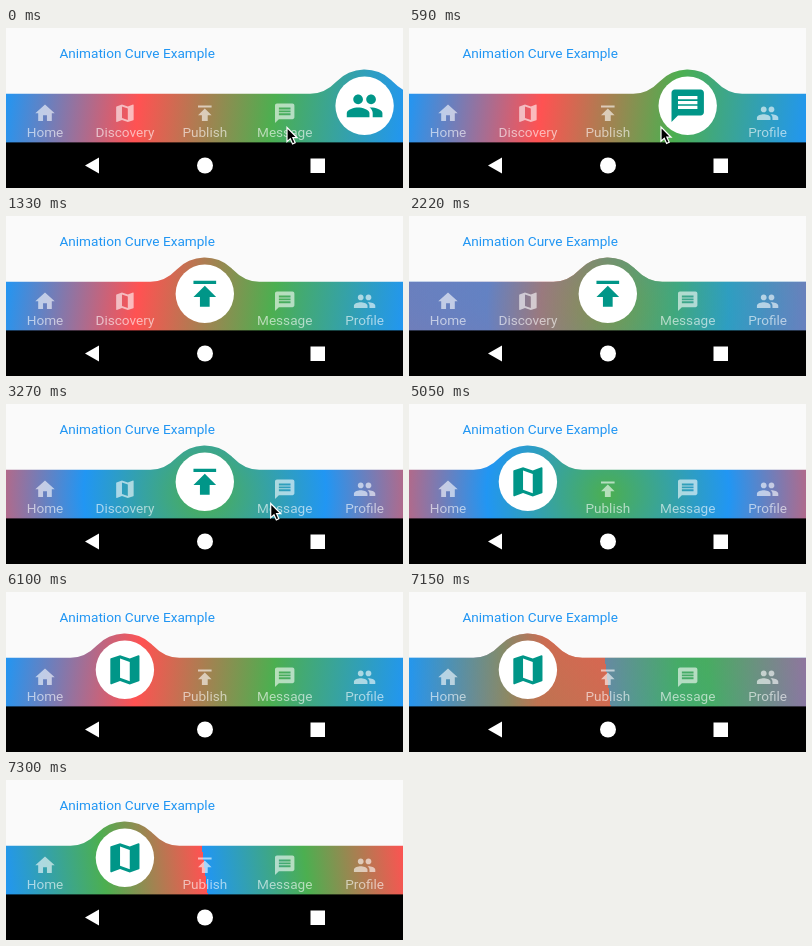
An HTML page with a canvas for the animation above (8000 ms loop, 397x160 px).

```html
<!DOCTYPE html>
<html lang="en">
<head>
<meta charset="utf-8">
<title>Animation Curve Example</title>
<style>
html, body { margin: 0; width: 100%; height: 100%; overflow: hidden; background: #fafafa; }
canvas { display: block; }
</style>
</head>
<body>
<canvas id="stage" width="397" height="160"></canvas>
<script>
const ctx = document.getElementById('stage').getContext('2d');
const W = 397, H = 160, TOP = 65.8, BOTTOM = 114.4, LOOP = 8000, STEP = 145;
const LEFT = -1, RIGHT = 398.5, MID = 198.8;
const BLUE = '#2196f3', RED = '#ff5252', GREEN = '#4caf50', TEAL = '#009688';
const FONT = '13.6px Roboto, sans-serif';

// Icons on a 24 unit grid
const tabs = [
  ['Home', 'M10 20v-6h4v6h5v-8h3L12 3 2 12h3v8z'],
  ['Discovery', 'M20.5 3l-.16.03L15 5.1 9 3 3.36 4.9c-.21.07-.36.25-.36.48V20.5c0 .28.22.5.5.5l.16-.03L9 18.9l6 2.1 5.64-1.9c.21-.07.36-.25.36-.48V3.5c0-.28-.22-.5-.5-.5zM15 19l-6-2.11V5l6 2.11V19z'],
  ['Publish', 'M5 4v2h14V4H5zm0 10h4v6h6v-6h4l-7-7-7 7z'],
  ['Message', 'M20 2H4c-1.1 0-1.99.9-1.99 2L2 22l4-4h14c1.1 0 2-.9 2-2V4c0-1.1-.9-2-2-2zm-2 12H6v-2h12v2zm0-3H6V9h12v2zm0-3H6V6h12v2z'],
  ['Profile', 'M16 11c1.66 0 2.99-1.34 2.99-3S17.66 5 16 5c-1.66 0-3 1.34-3 3s1.34 3 3 3zm-8 0c1.66 0 2.99-1.34 2.99-3S9.66 5 8 5C6.34 5 5 6.34 5 8s1.34 3 3 3zm0 2c-2.33 0-7 1.17-7 3.5V19h14v-2.5c0-2.33-4.67-3.5-7-3.5zm8 0c-.29 0-.62.02-.97.05 1.16.84 1.97 1.97 1.97 3.45V19h6v-2.5c0-2.33-4.67-3.5-7-3.5z']
].map(([label, d], i) => ({ label, icon: new Path2D(d), x: 39 + 79.9 * i }));

const arrow = new Path2D('M0 0V15.5L3.6 12.2 6.1 17.8 8.9 16.5 6.4 11.1H11z');

function fillStops(gradient, stops) {
  stops.forEach(([at, color]) => gradient.addColorStop(at, color));
  return gradient;
}
const linear = (y1, y2) => ctx.createLinearGradient(LEFT, y1, RIGHT, y2);
const rainbow = fillStops(linear(TOP, BOTTOM),
  [[0, BLUE], [1 / 3, RED], [2 / 3, GREEN], [1, BLUE]]);
const radial = fillStops(ctx.createRadialGradient(MID, 90, 0, MID, 90, 242.7),
  [[0, GREEN], [0.5, BLUE], [1, RED]]);
const repeated = fillStops(linear(BOTTOM, TOP),
  [[0, BLUE], [0.25, GREEN], [0.5, RED], [0.5, BLUE], [0.75, GREEN], [1, RED]]);

const taps = [[150, 4, 3], [1030, 3, 2], [3570, 2, 3], [4760, 3, 1]];   // time, from, to
const themes = [[2220, rainbow, radial], [5950, radial, rainbow], [7150, rainbow, repeated]];

// Cursor strokes: start, end of visibility, points visited one per step
const strokes = [
  [0, 450, [281, 99.5]],
  [450, 1330, [252, 99], [218, 99], [189, 98.5]],
  [2820, 4020, [335, 52], [296, 83], [262, 102], [264.7, 99.5]],
  [4020, 5050, [228, 99.5], [172, 99.5], [131, 99.5]]
];

// Stepped progress: 1/n at start, 1 after n - 1 further steps
const progress = (t, start, n) =>
  Math.max(0, Math.min(1, (Math.floor((t - start) / STEP) + 1) / n));

const latest = (list, t) => list.filter(e => e[0] <= t).pop() || list[0];
const ease = p => p * p * (3 - 2 * p);

function drawIcon(tab, y, scale, color) {
  ctx.save();
  ctx.translate(tab.x, y);
  ctx.scale(scale, scale);
  ctx.translate(-12, -12);
  ctx.fillStyle = color;
  ctx.fill(tab.icon);
  ctx.restore();
}

function disc(x, y, r, color) {
  ctx.fillStyle = color;
  ctx.beginPath();
  ctx.arc(x, y, r, 0, 7);
  ctx.fill();
}

// Flat bar with a circular bump whose feet are tangent curves
function barPath(x) {
  const r = 38.8, cy = 80.3, angle = 0.762;
  const dx = r * Math.cos(angle), dy = r * Math.sin(angle);
  const p = new Path2D();
  p.moveTo(0, TOP);
  p.lineTo(x - 54.4, TOP);
  p.quadraticCurveTo(x - 39.8, TOP, x - dx, cy - dy);
  p.arc(x, cy, r, Math.PI + angle, -angle);
  p.quadraticCurveTo(x + 39.8, TOP, x + 54.4, TOP);
  p.lineTo(W, TOP);
  p.lineTo(W, H);
  p.lineTo(0, H);
  return p;
}

function drawBar(t, x) {
  const [start, before, after] = latest(themes, t);
  const path = barPath(x);
  const mix = progress(t, start, 2);
  if (mix < 1) {
    ctx.fillStyle = before;
    ctx.fill(path);
  }
  ctx.globalAlpha = mix;
  ctx.fillStyle = after;
  ctx.fill(path);
  ctx.globalAlpha = 1;
}

function drawTabs(active, grow) {
  ctx.textAlign = 'center';
  tabs.forEach((tab, i) => {
    if (i === active) {
      disc(tab.x, 77.8, 29.2 * grow, '#fff');
      drawIcon(tab, 77.8, 1.62 * grow, TEAL);
    } else {
      drawIcon(tab, 85.3, 0.971, 'rgba(255,255,255,.6)');
      ctx.fillStyle = 'rgba(255,255,255,.6)';
      ctx.fillText(tab.label, tab.x, 109);
    }
  });
}

function drawSystemBar() {
  ctx.fillStyle = '#000';
  ctx.fillRect(0, BOTTOM, W, H - BOTTOM);
  ctx.fillStyle = '#fff';
  ctx.fill(new Path2D('M79 137.5L93 129.5V145.5z'));
  ctx.fillRect(304.5, 130.5, 14.5, 14.5);
  disc(199, 137.5, 8, '#fff');
}

function drawCursor(t) {
  const [start, end, ...points] = latest(strokes, t);
  if (t >= end) return;
  const step = Math.min(points.length - 1, Math.floor((t - start) / STEP));
  ctx.save();
  ctx.translate(...points[step]);
  ctx.scale(0.92, 0.92);
  ctx.lineWidth = 1.3;
  ctx.strokeStyle = '#fff';
  ctx.fillStyle = '#000';
  ctx.fill(arrow);
  ctx.stroke(arrow);
  ctx.restore();
}

function draw(t) {
  const [start, from, to] = latest(taps, t);
  const p = ease(progress(t, start, 2));
  ctx.fillStyle = '#fafafa';
  ctx.fillRect(0, 0, W, H);
  ctx.font = FONT;
  ctx.textAlign = 'left';
  ctx.fillStyle = BLUE;
  ctx.fillText('Animation Curve Example', 53.4, 30);
  drawBar(t, tabs[from].x + (tabs[to].x - tabs[from].x) * p);
  drawTabs(t < start ? from : to, p || 1);
  drawSystemBar();
  drawCursor(t);
}

const began = performance.now();
function tick() {
  draw((performance.now() - began) % LOOP);
  requestAnimationFrame(tick);
}
tick();
</script>
</body>
</html>
```
